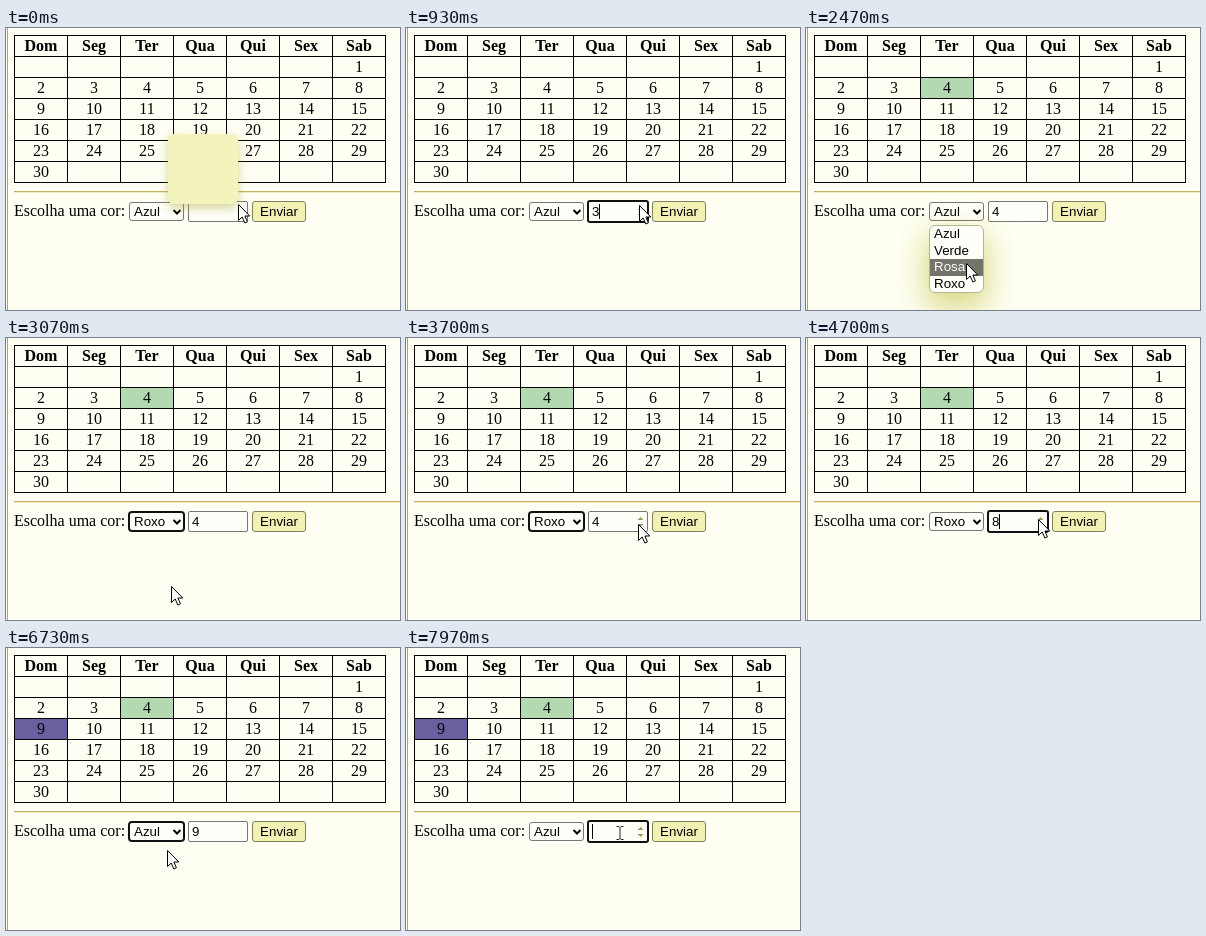
An HTML page that plays this animation: 394x282 px, repeating every 8 s.

```html
<!DOCTYPE html>
<html lang="pt">
<head>
<meta charset="utf-8">
<title>Calendário</title>
<style>
html, body { margin: 0; width: 100%; height: 100%; overflow: hidden; background: #fffff4; }
#stage { position: relative; width: 394px; height: 282px; overflow: hidden; color: #000;
  font: 16px/18px "Liberation Serif", serif; }
#stage > * { position: absolute; box-sizing: border-box; }
#edge { left: 1px; top: 0; width: 1px; height: 282px; background: #b9a555; }
table { left: 8px; top: 7px; width: 372px; border-collapse: collapse; table-layout: fixed; }
th, td { border: 1px solid #000; padding: 1px; height: 18px; text-align: center; }
#rule { left: 8px; top: 163px; width: 386px; height: 2px; background: #eeeec4; border-top: 1px solid #c3b05c; }
#label { left: 8px; top: 174px; white-space: nowrap; }
.ui { font: 13.333px/15px "Liberation Sans", sans-serif; border: 1px solid #767676; white-space: nowrap; }
.ui.focus { border-color: #101010; box-shadow: 0 0 0 1px #101010; }
#select { left: 123px; top: 174px; width: 55px; height: 19px; padding: 1px 4px; border-radius: 3px; background: #fffffa; }
#select svg { position: absolute; left: 42px; top: 6px; }
#input { left: 182px; top: 173px; width: 60px; height: 21px; padding: 2px 3px; border-radius: 2px; background: #fffffa; }
#input svg { position: absolute; left: 48px; top: 4px; }
#caret { display: inline-block; width: 1px; height: 15px; background: #000; vertical-align: top; }
#button { left: 246px; top: 173px; width: 54px; height: 21px; padding: 2px 0; text-align: center;
  border-color: #80805c; border-radius: 3px; background: #f1f1b4; }
#button.hover { background: #e8e8a6; }
#popup { left: 123px; top: 197px; width: 55px; height: 68px; border-color: #b4b48c; border-radius: 6px;
  background: #fffffa; overflow: hidden; }
#glow { left: 123px; top: 197px; width: 55px; height: 68px; border-radius: 6px;
  box-shadow: 0 12px 32px 2px rgba(185,185,45,.6); }
#popup div { height: 16.5px; line-height: 16.5px; padding-left: 4px; }
#popup .on { background: #74746a; color: #fff; }
#bubble { left: 162px; top: 106px; width: 70px; height: 70px; border-radius: 6px; background: #f3f3bd;
  box-shadow: 0 4px 10px rgba(170,170,60,.5); }
#cursor { left: 0; top: 0; overflow: visible; }
</style>
</head>
<body>
<div id="stage">
  <div id="edge"></div>
  <table id="calendar"></table>
  <div id="rule"></div>
  <div id="label">Escolha uma cor:</div>
  <div id="select" class="ui"><span id="color"></span>
    <svg width="10" height="7"><path d="M1.5 1L5 4.5L8.5 1" fill="none" stroke="#000" stroke-width="2"/></svg>
  </div>
  <div id="input" class="ui"><span id="value"></span><span id="caret"></span>
    <svg id="spinner" width="7" height="12"><path d="M.5 4L3.5 1L6.5 4ZM.5 8L3.5 11L6.5 8Z" fill="#969a62"/></svg>
  </div>
  <div id="button" class="ui">Enviar</div>
  <div id="glow"></div>
  <div id="popup" class="ui"></div>
  <div id="bubble"></div>
  <svg id="cursor" width="20" height="24">
    <path id="arrow" d="M.5 .5V16.5L4.2 13L6.8 19L9.4 17.9L6.9 12H11.8Z" fill="#fff" stroke="#000"/>
    <path id="beam" d="M-3.5 -6.5H-1L0 -5.5L1 -6.5H3.5M0 -5.5V6M-3.5 6.5H-1L0 5.5L1 6.5H3.5" fill="none" stroke="#222"/>
  </svg>
</div>
<script>
const LOOP = 8000;
const $ = id => document.getElementById(id);
const colors = ['Azul', 'Verde', 'Rosa', 'Roxo'];

const days = ['Dom', 'Seg', 'Ter', 'Qua', 'Qui', 'Sex', 'Sab'];
const row = cells => '<tr>' + cells.join('') + '</tr>';
let html = row(days.map(d => `<th>${d}</th>`));
for (let week = 0; week < 6; week++) {
  html += row(days.map((_, i) => {
    const day = week * 7 + i - 5;
    return day > 0 && day < 31 ? `<td id="day${day}">${day}</td>` : '<td></td>';
  }));
}
$('calendar').innerHTML = html;
$('popup').innerHTML = colors.map(c => `<div>${c}</div>`).join('');

// Each step changes part of the page state at a given time.
const steps = [
  [0, { bubble: true, color: 'Azul', value: '', focus: '', open: false, blue: false, purple: false }],
  [30, { bubble: false }],
  [200, { value: 1, focus: 'input' }],
  [450, { value: 2 }],
  [700, { value: 3 }],
  [1000, { value: 4 }],
  [1580, { blue: true, focus: '' }],
  [2150, { open: true }],
  [2850, { open: false, color: 'Roxo', focus: 'select' }],
  [4150, { value: 5, focus: 'input' }],
  [4300, { value: 6 }],
  [4450, { value: 7 }],
  [4600, { value: 8 }],
  [4850, { value: 9 }],
  [5380, { purple: true, focus: '' }],
  [6120, { open: true }],
  [6560, { open: false, color: 'Azul', focus: 'select' }],
  [7150, { focus: 'input' }],
  [7520, { value: '' }]
];

// Pointer path: time, x, y.
const path = [
  [0, 232, 176], [300, 233, 177], [1050, 233, 177], [1400, 272, 183], [1700, 272, 183],
  [2050, 168, 184], [2200, 168, 184], [2470, 160, 235], [2700, 158, 254], [2950, 158, 254],
  [3600, 232, 186], [3800, 232, 186], [4000, 232, 181], [4900, 232, 181], [5200, 270, 184],
  [5450, 270, 184], [5800, 170, 181], [6170, 170, 181], [6420, 150, 205], [6620, 150, 205],
  [7050, 214, 185], [LOOP, 214, 185]
];

function pointerAt(t) {
  const i = path.findIndex(p => p[0] > t);
  const [t0, x0, y0] = path[i - 1], [t1, x1, y1] = path[i];
  const u = (t - t0) / (t1 - t0), k = u * u * (3 - 2 * u);
  return [Math.round(x0 + (x1 - x0) * k), Math.round(y0 + (y1 - y0) * k)];
}

const show = (id, on) => { $(id).style.visibility = on ? 'visible' : 'hidden'; };
const text = (id, s) => { if ($(id).textContent !== String(s)) $(id).textContent = s; };

function render(t) {
  const past = steps.filter(s => s[0] <= t);
  const state = Object.assign({}, ...past.map(s => s[1]));
  const since = t - past[past.length - 1][0];
  const [x, y] = pointerAt(t);
  const over = (left, right) => x >= left && x < right && y >= 173 && y < 194;
  const typing = state.focus === 'input';

  text('color', state.color);
  text('value', state.value);
  show('bubble', state.bubble);
  show('caret', typing && since % 1000 < 500);
  show('spinner', typing || over(182, 242));
  $('select').classList.toggle('focus', state.focus === 'select' && !state.open);
  $('input').classList.toggle('focus', typing);
  $('button').classList.toggle('hover', over(246, 300));
  $('day4').style.background = state.blue ? '#b3d9b1' : '';
  $('day9').style.background = state.purple ? '#6a609f' : '';

  show('popup', state.open);
  show('glow', state.open);
  const hovered = y >= 198 ? Math.min(3, Math.floor((y - 198) / 16.5)) : colors.indexOf(state.color);
  [...$('popup').children].forEach((item, i) => item.classList.toggle('on', i === hovered));

  const beam = over(182, 228) && !state.open;
  show('beam', beam);
  show('arrow', !beam);
  $('cursor').style.transform = `translate(${x}px, ${y}px)`;
}

const start = performance.now();
function tick() {
  render((performance.now() - start) % LOOP);
  requestAnimationFrame(tick);
}
tick();
</script>
</body>
</html>
```
